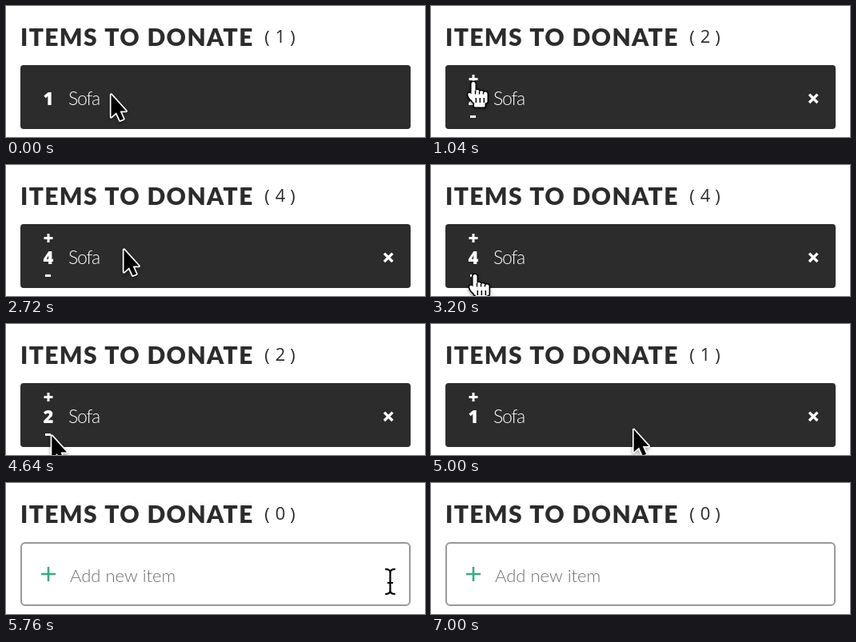
An HTML page with a canvas for the animation above (8320 ms loop, 524 px wide and 164 px high).

```html
<!DOCTYPE html>
<html lang="en">
<head>
<meta charset="utf-8">
<title>Items to donate</title>
<style>
html, body { margin: 0; width: 524px; height: 164px; overflow: hidden; background: #fff; }
canvas { display: block; }
</style>
</head>
<body>
<canvas id="stage" width="524" height="164"></canvas>
<script>
const ctx = document.getElementById('stage').getContext('2d');
const LOOP = 8320, STEP = 40, REMOVED = 5720, GONE = 7000;
const DARK = '#2c2c2c', GREEN = '#35ad86', GREY = '#989898';
const SANS = 'Lato, sans-serif', DIGITS = '"Open Sans", sans-serif';

const addClicks = [1040, 1640, 2480];
const minusClicks = [3600, 4040, 4680];

const spot = (x, y) => ({ x, y });
const home = spot(130, 108);
const move = (from, to, target) => ({ from, to, target });
const moves = [
  move(80, 600, spot(53, 95)),
  move(1760, 2200, spot(49, 94)),
  move(2560, 2720, spot(146, 103)),
  move(2720, 3200, spot(55, 137)),
  move(4620, 5400, spot(465, 121)),
  move(5400, 5560, spot(480, 123)),
  move(6160, 6640, spot(512, 63))
];

const clamp = p => Math.min(1, Math.max(0, p));
const ease = p => p * p * (3 - 2 * p);
const passed = (clicks, t) => clicks.filter(c => t >= c).length;

function countAt(t) {
  return t >= REMOVED ? 0 : 1 + passed(addClicks, t) - passed(minusClicks, t);
}

function pointerAt(t) {
  let { x, y } = home;
  for (const { from, to, target } of moves) {
    const p = ease(clamp((t - from) / (to - from)));
    x += (target.x - x) * p;
    y += (target.y - y) * p;
  }
  return spot(x, y);
}

function text(str, x, y, font, color, align = 'left', spacing = 0) {
  ctx.font = font;
  ctx.fillStyle = color;
  ctx.textAlign = align;
  ctx.letterSpacing = spacing + 'px';
  ctx.fillText(str, x, y);
}

function line(x1, y1, x2, y2, width, color) {
  ctx.strokeStyle = color;
  ctx.lineWidth = width;
  ctx.beginPath();
  ctx.moveTo(x1, y1);
  ctx.lineTo(x2, y2);
  ctx.stroke();
}

function plus(x, y, r, width, color) {
  line(x - r, y, x + r, y, width, color);
  line(x, y - r, x, y + r, width, color);
}

function cross(x, y, r, width, color) {
  line(x - r, y - r, x + r, y + r, width, color);
  line(x - r, y + r, x + r, y - r, width, color);
}

function box(x, y, w, h, r) {
  ctx.beginPath();
  ctx.roundRect(x, y, w, h, r);
}

function header(n) {
  text('ITEMS TO DONATE', 18, 50, '900 30px ' + SANS, DARK, 'left', 1.35);
  const font = '22px ' + DIGITS;
  text('(', 326.5, 47, font, DARK, 'center');
  text(n, 343, 46, font, DARK, 'center');
  text(')', 358.5, 47, font, DARK, 'center');
}

function itemRow(n, hover) {
  ctx.fillStyle = DARK;
  box(18, 74, 488, 80, 4);
  ctx.fill();
  text(n, 53, 124, '800 22px ' + DIGITS, '#fff', 'center');
  text('Sofa', 78, 124, '300 23px ' + SANS, '#fff', 'left', -1.2);
  if (!hover) return;
  plus(53, 91.5, 5.5, 3, '#fff');
  if (n > 1) line(49, 138.5, 56, 138.5, 3, '#fff');
  cross(478.2, 115.8, 5.2, 3.4, '#fff');
}

function emptyRow() {
  ctx.strokeStyle = GREY;
  ctx.lineWidth = 2;
  box(19, 75, 486, 78, 5);
  ctx.stroke();
  plus(53, 114, 9, 2.6, GREEN);
  text('Add new item', 80, 124, '300 22px ' + SANS, '#6c6c6c');
}

// Outline first with a soft shadow, then the body on top.
function outlined(shape, width, edge, body) {
  ctx.save();
  ctx.shadowColor = 'rgba(0,0,0,.4)';
  ctx.shadowBlur = 4;
  ctx.shadowOffsetY = 2;
  ctx.lineWidth = width;
  ctx.strokeStyle = edge;
  ctx.stroke(shape);
  ctx.restore();
  ctx.fillStyle = body;
  ctx.fill(shape);
}

function arrow() {
  outlined(new Path2D('M1.5 3V31L8 25.2L12.6 35.3L17 33.4L12.6 23.6H20.2Z'), 3.4, '#fff', '#000');
}

function hand() {
  const shape = new Path2D();
  shape.roundRect(-2.5, 0, 5, 24, 2.5);
  for (let i = 0; i < 3; i++) shape.roundRect(2.5 + 5 * i, 10 + 1.3 * i, 5, 14, 2.5);
  shape.roundRect(-2.5, 15, 20, 12, [0, 0, 5, 6]);
  shape.roundRect(1, 22, 13.5, 9.5, 1);
  shape.ellipse(-3, 18.5, 2.6, 5.5, -0.6, 0, 7);
  outlined(shape, 3.2, '#000', '#fff');
  for (let i = 0; i < 3; i++) {
    const x = 2.5 + 5 * i;
    line(x, 11 + i, x, 15.5, 1.4, '#000');
    line(x + 0.8, 20, x + 0.8, 26, 1.5, '#000');
  }
}

function beam() {
  const shape = new Path2D('M-5.8-15.2Q.5-15.2.5-10.5V11.5Q.5 16-5.8 16' +
    'M6.8-15.2Q.5-15.2.5-10.5V11.5Q.5 16 6.8 16M-3 2H4');
  for (const [width, color] of [[4, '#fff'], [2.2, '#000']]) {
    ctx.lineWidth = width;
    ctx.strokeStyle = color;
    ctx.stroke(shape);
  }
}

function pointerKind(t, { x, y }) {
  if (t > REMOVED) return x < 506 && y > 74 ? beam : arrow;
  const near = (cx, cy) => Math.abs(x - cx) < 9 && Math.abs(y - cy) < 10;
  const onMinus = t < 4640 && near(53, 138);
  return near(53, 92) || onMinus || near(479, 116) ? hand : arrow;
}

function draw(t) {
  const n = countAt(t);
  ctx.fillStyle = '#fff';
  ctx.fillRect(0, 0, 524, 164);
  header(n);
  if (n) itemRow(n, t >= 120);
  else emptyRow();
  if (t >= GONE) return;
  const at = pointerAt(t);
  ctx.save();
  ctx.translate(at.x, at.y);
  ctx.lineJoin = 'round';
  pointerKind(t, at)();
  ctx.restore();
}

const start = performance.now();
function frame() {
  const t = Math.max(0, performance.now() - start) % LOOP;
  draw(Math.floor(t / STEP) * STEP);
  requestAnimationFrame(frame);
}
frame();
</script>
</body>
</html>
```
